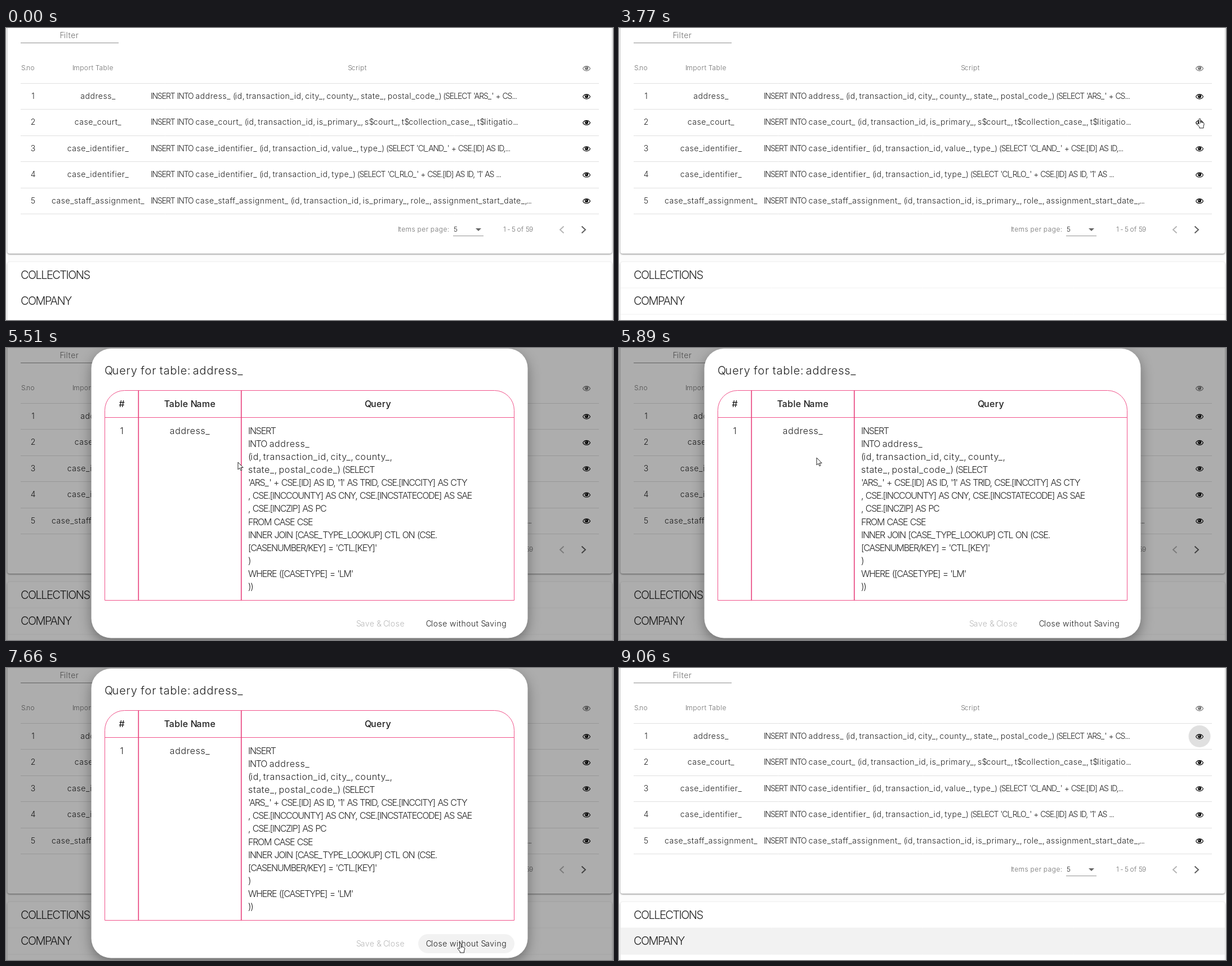
An HTML page with a canvas for the animation above (9.51 s loop, 1078 by 519 pixels).

```html
<!DOCTYPE html>
<html lang="en">
<head>
<meta charset="utf-8">
<title>Query table</title>
<style>
html, body { margin: 0; width: 100%; height: 100%; overflow: hidden; background: #fff; }
canvas { display: block; width: 1078px; height: 519px; }
</style>
</head>
<body>
<canvas id="stage" width="1078" height="519"></canvas>
<script>
const ctx = document.getElementById('stage').getContext('2d');
const W = 1078, H = 519, LOOP = 9510, STEP = LOOP / 135;
const INK = 'rgba(0,0,0,.87)', MUTED = 'rgba(0,0,0,.56)', RULE = '#e0e0e0', PINK = '#f0528a';
const PRESS = 4420, CLOSE = 8110;

const ROWS = [
  ['address_', "INSERT INTO address_ (id, transaction_id, city_, county_, state_, postal_code_) (SELECT 'ARS_' + CS..."],
  ['case_court_', 'INSERT INTO case_court_ (id, transaction_id, is_primary_, s$court_, t$collection_case_, t$litigatio...'],
  ['case_identifier_', "INSERT INTO case_identifier_ (id, transaction_id, value_, type_) (SELECT 'CI_AND_' + CSE.[ID] AS ID,..."],
  ['case_identifier_', "INSERT INTO case_identifier_ (id, transaction_id, type_) (SELECT 'CI_RLO_' + CSE.[ID] AS ID, '1' AS ..."],
  ['case_staff_assignment_', 'INSERT INTO case_staff_assignment_ (id, transaction_id, is_primary_, role_, assignment_start_date_,...']
];
const QUERY = `INSERT
INTO address_
(id, transaction_id, city_, county_,
state_, postal_code_) (SELECT
'ARS_' + CSE.[ID] AS ID, '1' AS TRID, CSE.[INCCITY] AS CTY
, CSE.[INCCOUNTY] AS CNY, CSE.[INCSTATECODE] AS SAE
, CSE.[INCZIP] AS PC
FROM CASE CSE
INNER JOIN [CASE_TYPE_LOOKUP] CTL ON (CSE.
[CASENUMBER/KEY] = 'CTL.[KEY]'
)
WHERE ([CASETYPE] = 'LM'
))`.split('\n');

// pointer moves: begin, end, x, y
const MOVES = [
  [290, 520, 632, 376], [670, 870, 81, 245], [1110, 1390, 186, 122], [1690, 2110, 783, 181],
  [2190, 2600, 1031, 171], [3540, 4200, 1033, 122], [5180, 5490, 412, 203], [5600, 5840, 351, 195],
  [5940, 6440, 560, 330], [6980, 7230, 757, 500], [7370, 7600, 807, 489], [8540, 8760, 812, 530]
];

const ramp = (t, a, b) => Math.max(0, Math.min(1, (t - a) / (b - a)));
const smooth = k => k * k * (3 - 2 * k);
const between = (t, a, b) => t >= a && t < b;

// cubic-bezier(0, 0, .2, 1)
function decelerate(x) {
  let lo = 0, hi = 1;
  for (let i = 0; i < 20; i++) {
    const u = (lo + hi) / 2;
    if (.6 * (1 - u) * u * u + u * u * u < x) lo = u; else hi = u;
  }
  return 3 * (1 - lo) * lo * lo + lo * lo * lo;
}

// geometric look: open lower case, tight capitals, plain spaces
const tracking = {};
function setFont(size, weight) {
  ctx.font = `${weight} ${size}px Inter, "Open Sans", sans-serif`;
  if (!tracking[ctx.font]) {
    ctx.letterSpacing = '0px';
    const fit = (s, em) => (size * em - ctx.measureText(s).width) / s.length;
    tracking[ctx.font] = { lower: fit('address_', 4.47), upper: fit('INSERTINTO', 5.12) };
  }
  return tracking[ctx.font];
}

function text(s, x, y, size, color = INK, align = 'left', weight = 350) {
  const { lower, upper } = setFont(size, weight);
  let width = 0;
  const runs = s.match(/[a-z_]+| +|[^a-z_ ]+/g).map(part => {
    const gap = (part[0] === ' ' ? 0 : /[a-z_]/.test(part) ? lower : upper) + 'px';
    ctx.letterSpacing = gap;
    const run = { part, gap, x: width };
    width += ctx.measureText(part).width;
    return run;
  });
  ctx.fillStyle = color;
  const left = align === 'center' ? x - width / 2 : x;
  for (const r of runs) {
    ctx.letterSpacing = r.gap;
    ctx.fillText(r.part, left + r.x, y);
  }
}

function box(x, y, w, h, r, fill) {
  ctx.beginPath();
  ctx.roundRect(x, y, w, h, r);
  ctx.fillStyle = fill;
  ctx.fill();
}

function shadowBox(x, y, w, h, r, blur, dy, shade) {
  ctx.save();
  ctx.shadowColor = shade;
  ctx.shadowBlur = blur;
  ctx.shadowOffsetY = dy;
  box(x, y, w, h, r, '#fff');
  ctx.restore();
}

function line(points, color, width = 1) {
  ctx.beginPath();
  for (let i = 0; i < points.length; i += 2) ctx.lineTo(points[i], points[i + 1]);
  ctx.strokeStyle = color;
  ctx.lineWidth = width;
  ctx.stroke();
}
const hline = (x1, x2, y, color) => line([x1, y, x2, y], color);
const chevron = (x, dir, color) => line([x - 3 * dir, 352.5, x + 3.5 * dir, 358.5, x - 3 * dir, 364.5], color, 1.9);

function disc(x, y, r, fill) {
  ctx.beginPath();
  ctx.arc(x, y, r, 0, 7);
  ctx.fillStyle = fill;
  ctx.fill();
}

function eye(y, color) {
  const x = 1031;
  ctx.beginPath();
  ctx.moveTo(x - 6.5, y);
  ctx.bezierCurveTo(x - 3.5, y - 5.4, x + 3.5, y - 5.4, x + 6.5, y);
  ctx.bezierCurveTo(x + 3.5, y + 5.4, x - 3.5, y + 5.4, x - 6.5, y);
  ctx.strokeStyle = color;
  ctx.lineWidth = 1.2;
  ctx.stroke();
  disc(x, y - .6, 3.1, color);
  disc(x - 1, y - 1.6, .8, '#fff');
}

function drawPage(t) {
  ctx.fillStyle = '#fcfcfc';
  ctx.fillRect(0, 0, W, H);
  shadowBox(2.5, -20, 1073.5, 421, 4, 3, 1, 'rgba(0,0,0,.5)');
  shadowBox(2.5, 416, 1073.5, 140, 4, 3, 1, 'rgba(0,0,0,.35)');

  text('Filter', 112.5, 18, 14, MUTED, 'center');
  hline(26, 200, 26.5, '#8e8e8e');
  text('S.no', 27, 75, 12, MUTED);
  text('Import Table', 154.5, 75, 12, MUTED, 'center');
  text('Script', 624, 75, 12, MUTED, 'center');
  eye(72, '#777');
  hline(26, 1053, 98.5, RULE);

  if (between(t, PRESS, 4710) || t >= CLOSE + 140) disc(1031, 121.5, 19.5, 'rgba(0,0,0,.12)');
  ROWS.forEach(([name, script], i) => {
    const y = 126 + i * 46.4;
    text(String(i + 1), 47.5, y, 14, INK, 'center');
    text(name, 163.5, y, 14, INK, 'center');
    text(script, 257, y, 14);
    eye(y - 4, '#111');
    hline(26, 1053, Math.round(y + 18.4) + .5, RULE);
  });

  text('Items per page:', 696, 362, 12, MUTED);
  text('5', 795, 362, 12);
  hline(794, 848, 369.5, '#949494');
  ctx.fillStyle = '#666';
  ctx.fill(new Path2D('M834 356H844L839 361Z'));
  text('1 - 5 of 59', 883, 362, 12, MUTED);
  chevron(987.5, -1, '#b4b4b4');
  chevron(1025.5, 1, '#5c5c5c');

  if (t >= CLOSE + 220) box(3, 462, 1073, 47, 0, '#f2f2f2');
  if (t >= 290) for (const y of [462, 509]) hline(3, 1076, y, '#f1f1f1');
  text('COLLECTIONS', 26, 446, 20);
  text('COMPANY', 26, 492, 20);
}

function tooltip(y, amount) {
  if (amount <= 0) return;
  ctx.save();
  ctx.globalAlpha = amount;
  box(986, y, 90, 24, 4, 'rgba(97,97,97,.92)');
  text('View/Edit Query', 1031, y + 15.5, 10, '#fff', 'center', 400);
  ctx.restore();
}

function drawDialog(t) {
  const open = decelerate(ramp(t, 4430, 4630));
  const alpha = open * (1 - ramp(t, CLOSE + 40, CLOSE + 150));
  if (alpha <= 0) return;
  const scale = .7 + .3 * open;
  ctx.save();
  ctx.globalAlpha = alpha;
  ctx.translate(539, 258.3);
  ctx.scale(scale, scale);
  ctx.translate(-539, -258.3);
  shadowBox(151.5, 1, 775, 514.5, 35, 22, 8, 'rgba(0,0,0,.36)');

  text('Query for table: address_', 175, 46.5, 20);
  ctx.beginPath();
  ctx.roundRect(175.5, 75.5, 727, 373, [35, 35, 0, 0]);
  ctx.strokeStyle = PINK;
  ctx.lineWidth = 1;
  ctx.stroke();
  hline(175.5, 902.5, 123.5, PINK);
  for (const x of [235.3, 417.8]) line([x, 75.5, x, 448.5], '#e83f7b', 1.6);

  text('#', 205, 104.5, 16, INK, 'center', 500);
  text('Table Name', 326.5, 104.5, 16, INK, 'center', 500);
  text('Query', 660.5, 104.5, 16, INK, 'center', 500);
  text('1', 205, 152.5, 16, INK, 'center');
  text('address_', 326.5, 152.5, 16, INK, 'center');
  QUERY.forEach((s, i) => text(s, 430, 152.5 + i * 23.15, 16));

  if (t >= 7220) box(732, 473, 171, 34, 17, `rgba(0,0,0,${t >= CLOSE ? .11 : .05})`);
  text('Save & Close', 665, 494.5, 14, 'rgba(0,0,0,.28)', 'center');
  text('Close without Saving', 817.5, 494.5, 14, INK, 'center');
  ctx.restore();
}

const ARROW = new Path2D('M0 0V13L3 10.3L5 14.8L7 13.9L5 9.6H9.2Z');
const HAND = new Path2D('M-1.4 1Q0 -1 1.4 1V6.2L6.4 7.6Q8 8.2 7.7 10L6.6 14V17H-.6V15L-4.6 10.4Q-5 8.2 -3 8.6L-1.4 10.2Z');
const BEAM = new Path2D('M-3 -8H-1L0 -7L1 -8H3M0 -7V7M-3 8H-1L0 7L1 8H3');

function drawCursor(t) {
  if (t < 280 || t > 8760) return;
  let x = 985, y = 503;
  for (const [a, b, toX, toY] of MOVES) {
    const k = smooth(ramp(t, a, b));
    x += (toX - x) * k;
    y += (toY - y) * k;
  }
  const beam = between(t, 1380, 1700);
  const hand = between(t, 2600, PRESS) || between(t, 7220, CLOSE + 150);
  const shape = beam ? BEAM : hand ? HAND : ARROW;
  ctx.save();
  ctx.translate(x, y);
  ctx.strokeStyle = '#222';
  ctx.lineWidth = 1;
  ctx.lineJoin = 'round';
  ctx.fillStyle = '#fff';
  if (!beam) ctx.fill(shape);
  ctx.stroke(shape);
  if (hand) line([1.4, 6, 1.4, 9], '#222', .8);
  ctx.restore();
}

function draw(t) {
  drawPage(t);
  tooltip(202, ramp(t, 2750, 2900) * (1 - ramp(t, 3560, 3690)));
  tooltip(155, ramp(t, 3850, 4000) * (1 - ramp(t, PRESS, 4590)));
  const shade = .32 * ramp(t, 4390, 4640) * (1 - ramp(t, CLOSE + 40, CLOSE + 450));
  ctx.fillStyle = `rgba(0,0,0,${shade})`;
  ctx.fillRect(0, 0, W, H);
  drawDialog(t);
  drawCursor(t);
}

let start = null, last = -1;
function tick(now) {
  if (start === null) start = now;
  const t = Math.floor((now - start) % LOOP / STEP) * STEP;
  if (t !== last) draw(last = t);
  requestAnimationFrame(tick);
}
requestAnimationFrame(tick);
</script>
</body>
</html>
```
